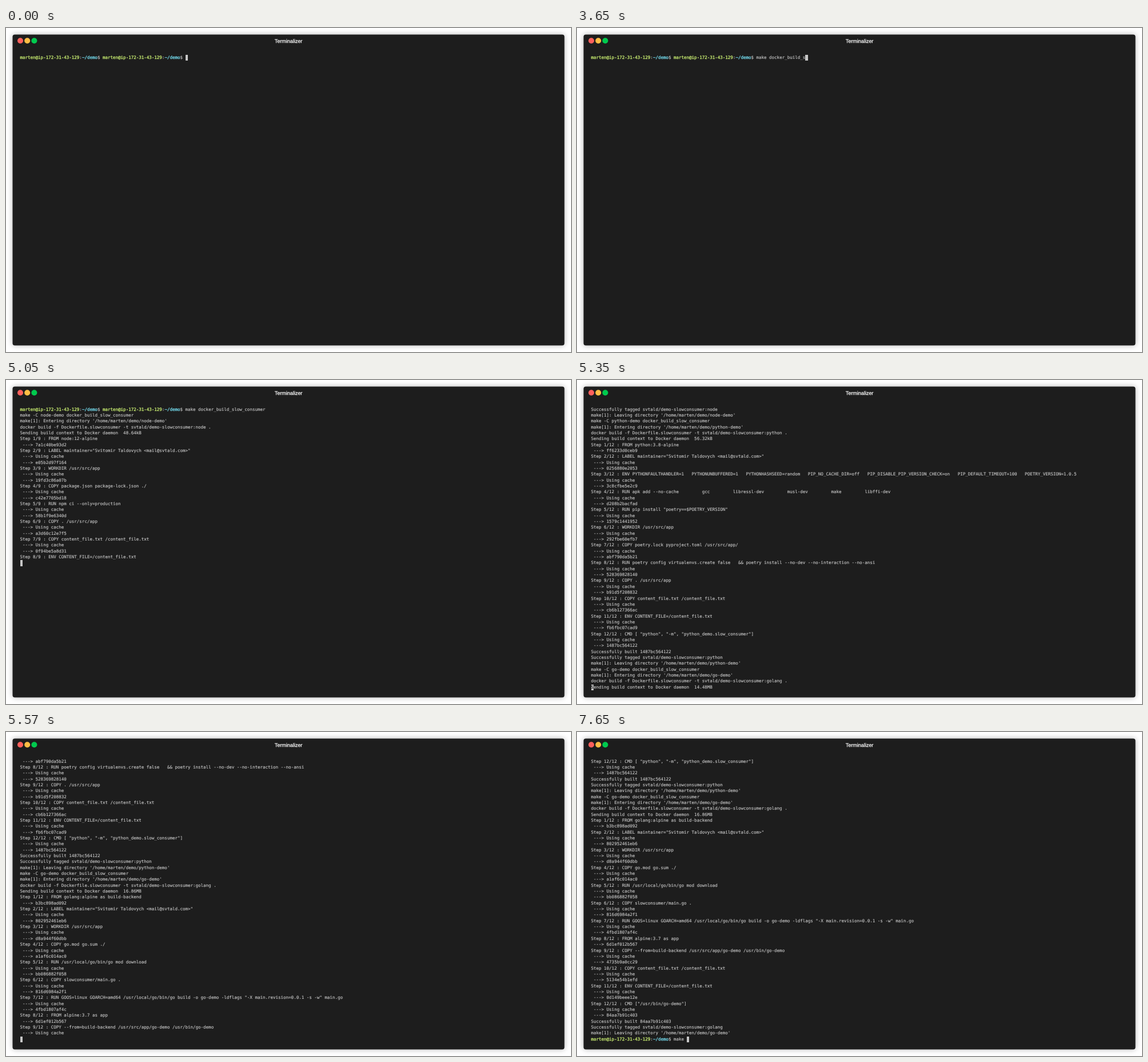
An HTML page for the animation above (8 s loop, 988 px wide and 567 px high).

```html
<!DOCTYPE html>
<html lang="en">
<head>
<meta charset="utf-8">
<title>Terminal</title>
<style>
html, body { margin: 0; width: 100%; height: 100%; overflow: hidden; background: #fff; }
svg { position: absolute; left: 0; top: 0; }
#win { filter: drop-shadow(0 0 5px rgba(0, 0, 0, .3)); }
#title {
  position: absolute; left: 0; top: 16.5px; width: 988px; text-align: center; color: #fff;
  font: 9px/12px "Liberation Sans", Arial, sans-serif; text-rendering: geometricPrecision;
  -webkit-text-stroke: .25px;
}
#screen {
  position: absolute; left: 24.5px; top: 46.5px; margin: 0; color: #c8c8c8; white-space: pre;
  font: 7.5px/10.345px "DejaVu Sans Mono", monospace; text-rendering: geometricPrecision;
  font-variant-ligatures: none; -webkit-text-stroke: .12px;
}
#screen b { color: #c8ed71; font-weight: normal; -webkit-text-stroke: .3px; }
#screen .dir { color: #75dff2; }
#screen u { display: inline-block; text-decoration: none; background: #c7c7c7; color: #1d1d1d; }
</style>
</head>
<body>
<svg width="988" height="567">
  <rect id="win" x="11.5" y="11.5" width="965" height="544" rx="4" fill="#1d1d1d"/>
  <circle cx="25" cy="22.3" r="5" fill="#ff605c"/>
  <circle cx="37.2" cy="22.3" r="5" fill="#ffbd44"/>
  <circle cx="49.4" cy="22.3" r="5" fill="#00ca4e"/>
</svg>
<div id="title">Terminalizer</div>
<pre id="screen"></pre>
<script>
const LOOP = 8000, ROWS = 48;
const USER = "marten", REPO = "svtald/demo-slowconsumer";
const LABEL = 'LABEL maintainer="Svitomir Taldovych <mail@svtald.com>"';
const CONTENT = ["COPY content_file.txt /content_file.txt", "ENV CONTENT_FILE=/content_file.txt"];
const PROMPT = `<b>${USER}@ip-172-31-43-129</b>:<b class="dir">~/demo</b>$ `;

const esc = s => s.replace(/&/g, "&amp;").replace(/</g, "&lt;");
const cursor = (c = " ") => `<u>${c}</u>`;

// Log of one image build; every step but FROM comes from the cache.
function build(tag, dir, size, steps, ids) {
  ids = ids.split(" ");
  const path = `directory '/home/${USER}/demo/${dir}'`;
  const log = [
    `make -C ${dir} docker_build_slow_consumer`,
    `make[1]: Entering ${path}`,
    `docker build -f Dockerfile.slowconsumer -t ${REPO}:${tag} .`,
    `Sending build context to Docker daemon  ${size}`
  ];
  steps.forEach((cmd, i) => {
    log.push(`Step ${i + 1}/${steps.length} : ${cmd}`);
    if (!cmd.startsWith("FROM")) log.push(" ---> Using cache");
    log.push(` ---> ${ids[i]}`);
  });
  return [...log,
    `Successfully built ${ids[ids.length - 1]}`,
    `Successfully tagged ${REPO}:${tag}`,
    `make[1]: Leaving ${path}`
  ].map(esc);
}

const log = [
  PROMPT + PROMPT + "make docker_build_slow_consumer",
  ...build("node", "node-demo", "48.64kB", [
    "FROM node:12-alpine", LABEL, "WORKDIR /usr/src/app",
    "COPY package.json package-lock.json ./", "RUN npm ci --only=production",
    "COPY . /usr/src/app", ...CONTENT, 'CMD [ "node", "slow_consumer.js"]'
  ], "7a1c40be93d2 e05b2d97f164 19fd3c86a07b c42e7705bd18 58b1f9e6340d " +
     "a3d60c12e7f5 0f94be5a8d31 d7e2186c49ba 63c8f05d2a9e"),
  ...build("python", "python-demo", "56.32kB", [
    "FROM python:3.8-alpine", LABEL,
    "ENV " + ["PYTHONFAULTHANDLER=1", "PYTHONUNBUFFERED=1", "PYTHONHASHSEED=random", "PIP_NO_CACHE_DIR=off",
      "PIP_DISABLE_PIP_VERSION_CHECK=on", "PIP_DEFAULT_TIMEOUT=100", "POETRY_VERSION=1.0.5"].join("   "),
    ["RUN apk add --no-cache", "gcc", "libressl-dev", "musl-dev", "make", "libffi-dev"].join(" ".repeat(9)),
    'RUN pip install "poetry==$POETRY_VERSION"',
    "WORKDIR /usr/src/app",
    "COPY poetry.lock pyproject.toml /usr/src/app/",
    "RUN poetry config virtualenvs.create false   && poetry install --no-dev --no-interaction --no-ansi",
    "COPY . /usr/src/app", ...CONTENT,
    'CMD [ "python", "-m", "python_demo.slow_consumer"]'
  ], "ff6233d0ceb9 0256880e2053 3c8cfbe5e2c9 d208b2bacfad 1579c1441952 292fbe60efb7 " +
     "abf790da5b21 528369828140 b91d5f208832 cb6b127366ac fb6fbc07cad9 1487bc564122"),
  ...build("golang", "go-demo", "16.86MB", [
    "FROM golang:alpine as build-backend", LABEL, "WORKDIR /usr/src/app",
    "COPY go.mod go.sum ./", "RUN /usr/local/go/bin/go mod download",
    "COPY slowconsumer/main.go .",
    'RUN GOOS=linux GOARCH=amd64 /usr/local/go/bin/go build -o go-demo -ldflags "-X main.revision=0.0.1 -s -w" main.go',
    "FROM alpine:3.7 as app",
    "COPY --from=build-backend /usr/src/app/go-demo /usr/bin/go-demo",
    ...CONTENT, 'CMD ["/usr/bin/go-demo"]'
  ], "b3bc898ad092 802952461eb6 d8a944f60dbb a1af6c014ac0 bb086882f058 816d6984a2f1 " +
     "4fbd1807af4c 6d1ef012b567 4735b9a0cc29 5134e54b1efd 0d149beee12e 84aa7b91c403")
];

// Typed text by time, then number of finished log lines by time.
const typed = [
  [0, ""], [900, "m"], [990, "ma"], [1140, "mak"], [1220, "make"], [1390, "make "],
  [1830, "make d"], [1930, "make do"], [2020, "make doc"], [2310, "make docker_build_"],
  [3650, "make docker_build_s"], [3780, "make docker_build_sl"],
  [3970, "make docker_build_slow_consumer "],
  [5820, ""], [7160, "m"], [7250, "ma"], [7400, "mak"], [7490, "make"], [7650, "make "]
];
const printed = [
  [0, 0], [4830, 1], [4850, 3], [4900, 5], [4960, 14], [5020, 26], [5080, 34], [5140, 38],
  [5240, 57], [5350, 80], [5370, 82], [5470, 93], [5570, 104], [5620, 108], [5720, 113], [5820, log.length]
];
const at = (list, t) => list.filter(e => e[0] <= t).pop()[1];

function render(t) {
  const n = at(printed, t), input = at(typed, t);
  const rows = log.slice(0, n);
  const last = rows[n - 1] || "";
  if (n === 0) rows.push(PROMPT + PROMPT + input + cursor());
  else if (n === log.length) rows.push(PROMPT + input + cursor());
  else if (last.startsWith("Sending"))
    rows[n - 1] = cursor("S") + last.slice(1).replace("16.86", "14.48");
  else rows.push(cursor());
  return rows.slice(-ROWS).join("\n");
}

const screenEl = document.getElementById("screen");
let shown;
function tick() {
  const html = render(performance.now() % LOOP);
  if (html !== shown) screenEl.innerHTML = shown = html;
  requestAnimationFrame(tick);
}
tick();
</script>
</body>
</html>
```
